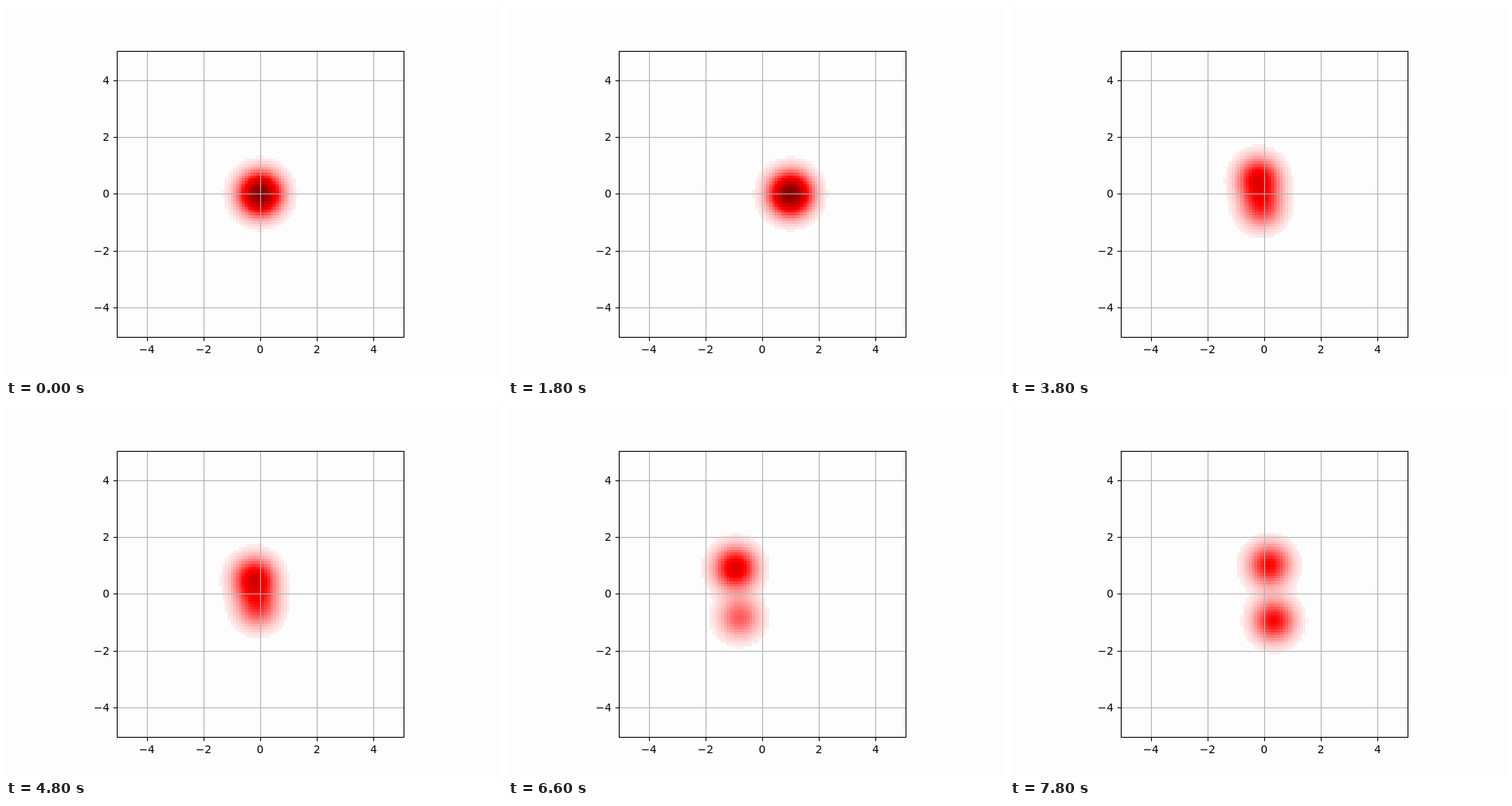
An HTML page with a canvas that plays this animation: 640x480 px, repeating every 8 s.

```html
<!DOCTYPE html>
<html lang="en">
<head>
<meta charset="utf-8">
<title>Phase space density</title>
<style>
  html, body { margin: 0; width: 100%; height: 100%; overflow: hidden; background: #fdfdfd; }
  canvas, svg { position: absolute; left: 0; top: 0; width: 640px; height: 480px; display: block; }
  text { font: 13.89px "DejaVu Sans", sans-serif; fill: #000; }
  .grid { stroke: #b0b0b0; stroke-width: 1.11; }
  .axis { stroke: #000; stroke-width: 1.11; fill: none; }
</style>
</head>
<body>
<canvas id="density" width="640" height="480"></canvas>
<svg id="axes" viewBox="0 0 640 480"></svg>
<script>
const LEFT = 143.2, TOP = 57.6, SIZE = 369.6, CELLS = 101;
const CELL = SIZE / CELLS, UNIT = CELL * 10;
const STEP = 200, LOOP = 8000, LEAD = 6, STEPS = 4, CUTOFF = 0.033;

// Two Gaussian lobes after each move: x, y, weight, x, y, weight
const POSES = [
  [0, 0, 0.57, 0, 0, 0.43],
  [1, 0, 0.57, 1, 0, 0.43],
  [0.82, 0.53, 0.57, 0.94, -0.47, 0.41],
  [-0.2, 0.53, 0.57, -0.09, -0.47, 0.4],
  [-0.2, 0.53, 0.62, -0.09, -0.48, 0.37],
  [-1.19, 0.57, 0.7, -1.09, -0.5, 0.3],
  [-0.86, 1.02, 0.59, -0.7, -0.95, 0.33],
  [0.18, 1.02, 0.5, 0.34, -0.95, 0.5]
];

function drawAxes() {
  const parts = [];
  const line = (cls, x1, y1, x2, y2) =>
    parts.push(`<line class="${cls}" x1="${x1}" y1="${y1}" x2="${x2}" y2="${y2}"/>`);
  const label = (value, x, y, anchor) =>
    parts.push(`<text x="${x}" y="${y}" text-anchor="${anchor}">${String(value).replace("-", "\u2212")}</text>`);

  for (let v = -4; v <= 4; v += 2) {
    const x = LEFT + SIZE / 2 + v * UNIT, y = TOP + SIZE / 2 - v * UNIT;
    const px = Math.round(x) + 0.5, py = Math.round(y) + 0.5;
    line("grid", px, 58, px, 427);
    line("grid", 143, py, 513, py);
    line("axis", px, 428, px, 432.4);
    line("axis", 138.6, py, 143, py);
    label(v, x, 448, "middle");
    label(v, 133.5, Math.round(y) + 5, "end");
  }
  parts.push('<rect class="axis" x="143.5" y="58.5" width="370" height="369"/>');
  document.getElementById("axes").innerHTML = parts.join("");
}

function poseAt(tick) {
  if (tick < LEAD) return POSES[0];
  const n = tick - LEAD, move = Math.floor(n / (STEPS + 1));
  const f = Math.min(STEPS, n % (STEPS + 1) + 1) / STEPS;
  return POSES[move].map((a, i) => a + (POSES[move + 1][i] - a) * f);
}

// White to red, then red to dark red
function color(v) {
  if (v > 0.5) return `rgb(${Math.round(255 * (1.5 - v))},0,0)`;
  const c = Math.round(255 * (1 - 2 * v));
  return `rgb(255,${c},${c})`;
}

const ctx = document.getElementById("density").getContext("2d");
const edge = (start, i) => Math.round(start + i * CELL);
const lobe = (dx, dy) => Math.exp(-2 * (dx * dx + dy * dy));

function drawDensity([x1, y1, w1, x2, y2, w2]) {
  ctx.clearRect(0, 0, 640, 480);
  for (let row = 0; row < CELLS; row++) {
    const y = (50 - row) / 10, top = edge(TOP, row), h = edge(TOP, row + 1) - top;
    for (let col = 0; col < CELLS; col++) {
      const x = (col - 50) / 10;
      const v = w1 * lobe(x - x1, y - y1) + w2 * lobe(x - x2, y - y2);
      if (v < CUTOFF) continue;
      const left = edge(LEFT, col);
      ctx.fillStyle = color(Math.min(v, 1));
      ctx.fillRect(left, top, edge(LEFT, col + 1) - left, h);
    }
  }
}

const start = performance.now();
let shown = -1;

function render() {
  const tick = Math.floor((performance.now() - start) % LOOP / STEP);
  if (tick !== shown) {
    shown = tick;
    drawDensity(poseAt(tick));
  }
  requestAnimationFrame(render);
}

drawAxes();
render();
</script>
</body>
</html>
```
